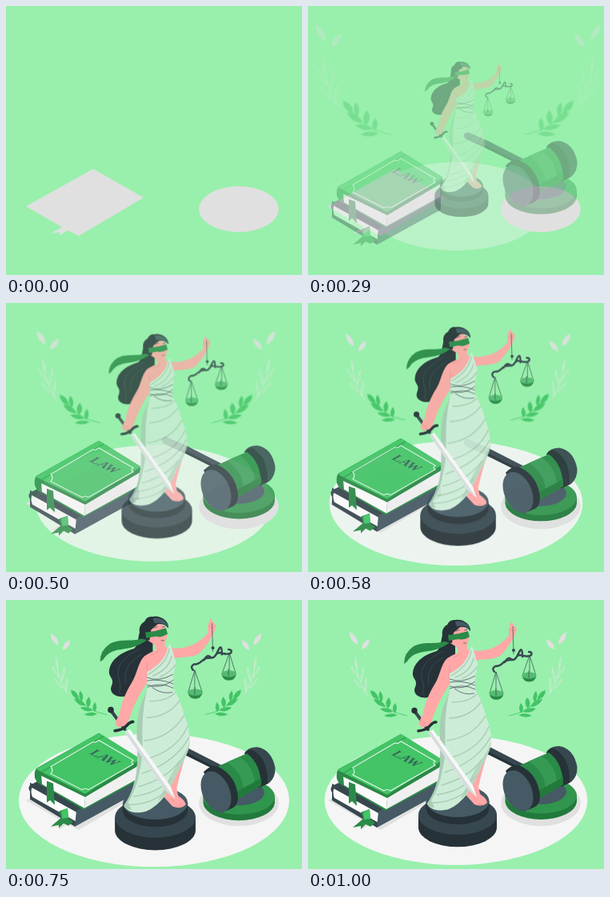
Write an HTML page that moves like this. It is 370x337 px and loops after 1040 ms.

```html
<!DOCTYPE html>
<html lang="en">
<head>
<meta charset="utf-8">
<title>Law</title>
<style>
html, body { margin: 0; height: 100%; overflow: hidden; background: #98f0ac }
svg { display: block; width: 370px; height: 337px }
.fold { fill: none; stroke: #a9ccb5; stroke-width: 1.4; stroke-linecap: round }
.thin { fill: none; stroke: #37474f; stroke-width: .7 }
.crease { fill: none; stroke: #e98b8c; stroke-width: .7 }
.skin { fill: #ffa8a7 }
.ink { fill: #263238 }
.slate { fill: #37474f }
.steel { fill: #455a64 }
.leaf { fill: #43c466 }
.deep { fill: #2a8a47 }
.dark { fill: #217a3b }
.page { fill: #fafafa }
.gown { fill: #cdecd7 }
</style>
</head>
<body>
<svg viewBox="0 0 370 337">
  <ellipse id="floor" cx="185" cy="251" rx="164.3" ry="81" fill="#f5f5f5"/>

  <g fill="#e0e0e0">
    <path d="M25 251 109 204 172 240 91 288 77 281 66 288 68 283 56 285 70 277Z"/>
    <ellipse cx="291" cy="254.5" rx="49.8" ry="28.7"/>
  </g>

  <g id="plants">
    <g id="sprig"></g>
    <use href="#sprig" transform="matrix(-1 0 0 1 375 0)"/>
  </g>

  <g id="books">
    <!-- lower book -->
    <path class="slate" d="M30 233 Q27 237 30 241 L30 251 86 285 166 241 166 222 108 196Z"/>
    <path class="page" d="M33 235 88 266 88 279 33 248 Q30 241 33 235Z"/>
    <path class="steel" d="M88 265 166 221 166 241 86 285Z"/>
    <path class="slate" d="M30 230 88 262 88 267 30 235Z"/>
    <path class="deep" d="M66 266 77 262 78 275 84 279 78 284 72 281 66 287 66 283 56 285 69 274Z"/>
    <path class="leaf" d="M69 266 77 262 78 274 70 275Z"/>
    <!-- upper book -->
    <path class="deep" d="M38 212 Q35 216 36 224 L39 230 97 264 166 227 168 201 116 168Z"/>
    <path class="page" d="M44 220 99 248 98 262 45 232Z"/>
    <path fill="#f0f0f0" d="M99 248 167 208 165 225 98 262Z"/>
    <path class="leaf" d="M37 213 114 169 Q117 168 120 170 L168 200 168 204 99 245 38 215Z"/>
    <path class="deep" d="M37 213 99 244 168 201 168 205 99 248 37 218Z"/>
    <path fill="none" stroke="#2f9f50" stroke-width="1.2" d="M44 217 122 172"/>
    <path fill="none" stroke="#e3f7e8" stroke-width="1.1" d="M56 210 109 179 Q111 181 116 177 L159 202 Q155 205 159 207 L103 239 Q99 236 95 239 L56 219 Q60 215 56 210Z"/>
    <text transform="matrix(.83 .43 -.87 .5 103.5 193.5)" font-family="'Liberation Serif','Noto Serif',serif" font-weight="bold" font-size="16.5" fill="#37655a">LAW</text>
    <path class="deep" d="M51 228 59 231 61 258 55 252 51 255Z"/>
  </g>

  <g id="gavel">
    <path class="dark" d="M246.5 245V253A44.8 23 0 0 0 336 253V245Z"/>
    <ellipse cx="291.2" cy="245" rx="44.8" ry="22.5" fill="#30954d"/>
    <ellipse cx="291" cy="240" rx="32" ry="16" class="steel"/>
    <path class="slate" d="M196 180 Q193 173 200 172 L225 183 270 206 267 213 222 190Z"/>
    <path class="ink" d="M198 181 224 189 267 211 266 214 222 192Z"/>
    <path class="slate" d="M298 191 Q302 183 314 183 Q332 186 336.500 209 Q337 221 329 228 L316 234 Q318 213 298 191Z"/>
    <path class="ink" d="M298 191 Q304 184 309 187 Q328 198 327 229 L316 234 Q316 210 298 191Z"/>
    <path class="deep" d="M263 208 301 191 Q318 203 319 231 L287 250 Q287 225 263 208Z"/>
    <path fill="#369a54" d="M276 202 292 195 Q310 208 311 229 L297 237 Q296 215 276 202Z"/>
    <path class="dark" d="M288 239 319 222 319 231 287 250Z"/>
    <path class="ink" d="M247 214 Q256 205 264 207 Q288 218 290 246 Q290 257 282 260 L270 265Z"/>
    <ellipse cx="262.5" cy="239" rx="17" ry="27" transform="rotate(-24 262.5 239)" class="steel"/>
  </g>

  <g id="statue">
    <path class="ink" d="M138 270V285A49 24.3 0 0 0 236 285V270Z"/>
    <ellipse cx="187" cy="269.5" rx="49" ry="24.5" class="slate"/>
    <path class="ink" d="M147.5 252V261A39.5 20 0 0 0 226.5 261V252Z"/>
    <ellipse cx="187" cy="252" rx="39.5" ry="20" class="steel"/>

    <!-- hair and ribbon -->
    <path class="ink" d="M172 36C164 47 169 57 161 64C147 68 133 76 131 91C130 99 138 100 134 109C130 118 140 124 150 122C160 120 160 111 167 104L184 72 184 48Z"/>
    <path fill="none" stroke="#455a64" stroke-width=".6" d="M169 64C149 74 138 85 143 101S139 116 146 119M170 71C152 82 149 92 151 106"/>
    <path class="deep" d="M176 49C163 58 147 50 132 58Q120 66 120 80L124 77C133 63 147 66 160 62Q172 58 177 53Z"/>

    <!-- arms, neck, leg -->
    <path class="skin" d="M186 57 198 55 199 62C211 65 224 64 235 58Q245 52 251 45L251 36 254 27 257 31 261 36 259 43Q252 58 240 70C229 76 218 73 211 76L208 88 178 104C170 116 163 128 158 142L152 158 142 158 143 146C145 133 150 119 158 106C165 96 166 80 174 73Q182 68 188 66Z"/>
    <path class="crease" d="M251 36 256 39 260 36M177 82 177 99M192 66Q187 71 181 72"/>
    <path class="skin" d="M204 205 225 190Q217 216 213 234L215 243Q224 249 224 254 218 260 208 256L197 244Z"/>
    <path class="crease" d="M206 246 210 251M212 255 218 256"/>

    <!-- gown -->
    <path class="gown" d="M205 57 212 80 209 97 209 112C216 124 220 136 223 147C227 158 230 170 229 181C226 194 215 211 209 226L199 243Q188 257 176 262C165 265 153 264 149 255C158 243 164 224 165 205C167 184 162 158 168 136L177 114 177 92C187 88 200 76 202 63Z"/>
    <path fill="#a9ccb5" d="M177 114Q173 130 172 146C170 170 174 190 168 213Q164 236 154 251L158 260Q150 260 149 255C160 239 165 220 165 203 166 181 162 159 168 136Z"/>
    <path fill="#b4d6bf" d="M229 176C226 191 212 204 203 224L190 250 199 243 209 226C216 208 228 194 229 176Z"/>
    <path class="fold" d="M204 64Q201 82 179 95M207 73Q203 90 184 97M211 84Q204 94 193 98M211 118Q201 128 180 128M216 128Q202 147 177 148M222 145Q206 172 174 176M226 159Q212 190 173 199M228 172Q212 202 171 216M217 200Q202 222 167 232M207 222Q190 240 161 244M201 237Q182 254 155 254"/>
    <path class="thin" d="M177 99Q192 105 209 95M177 103Q193 100 209 107M177 108Q194 114 209 102M177 111Q194 104 209 112M183 111Q195 120 208 117"/>

    <!-- head -->
    <path class="skin" d="M176 37Q187 29 199 37L202 47 199 57Q193 63 186 59L178 54Z"/>
    <path class="ink" d="M171 52C165 42 168 34 174 31Q177 24 184 25C193 23 204 30 203 39Q198 33 190 34L182 41 180 54Z"/>
    <path class="steel" d="M184 27C194 25 202 31 203 38Q196 31 186 33Z"/>
    <path class="deep" d="M175 44Q188 43 200 39L202 46Q194 51 188 49L176 51Z"/>
    <path class="thin" stroke="#ad4f57" d="M194 54 198 54"/>
    <path class="thin" d="M185 39 190 37M195 38 199 37"/>

    <!-- sword -->
    <path fill="#f7f7f7" d="M150 166 156 162 206 232 211 247 199 236Z"/>
    <path fill="#d5dcdc" d="M150 166 153 164 211 247 199 236Z"/>
    <path fill="none" stroke="#37474f" stroke-width="4" stroke-linecap="round" d="M133 139 150 162"/>
    <circle cx="133" cy="138.5" r="3.7" class="ink"/>
    <path fill="none" stroke="#263238" stroke-width="3.5" stroke-linecap="round" d="M138 164Q148 163 152 158T160 153"/>
    <path class="skin" d="M142 146 151 147 153 153 149 158 142 160 138 155Z"/>
    <path class="crease" d="M141 152 148 155M142 156 147 158"/>

    <!-- scales -->
    <path class="thin" d="M256 33 257 68M235 90 227 117M235 90 235 121M235 90 244 117M277 69 268 95M277 69 277 99M277 69 285 95"/>
    <path fill="none" stroke="#37474f" stroke-width="2.4" stroke-linecap="round" d="M233 90Q229 86 234 83C243 83 242 78 248 76S258 77 261 71 272 74 279 69Q281 65 276 65M246 78Q250 70 254 74T263 67 268 71"/>
    <circle cx="257" cy="63" r="2" class="slate"/>
    <g id="pan">
      <path class="deep" d="M226.500 117Q228 125 235.500 125T244.500 117Z"/>
      <ellipse cx="235.5" cy="117" rx="9" ry="4" fill="#54bb71"/>
      <path class="thin" d="M235 111 235 120"/>
    </g>
    <use href="#pan" x="41" y="-22.5"/>
  </g>
</svg>
<script>
const $ = id => document.getElementById(id);

// A leaf between two points, bulging by w on either side
function leaf(x, y, u, v, w) {
  const mx = (x + u) / 2, my = (y + v) / 2, n = Math.hypot(u - x, v - y);
  const dx = (y - v) / n * w, dy = (u - x) / n * w;
  return `M${x} ${y}Q${mx + dx} ${my + dy} ${u} ${v}Q${mx - dx} ${my - dy} ${x} ${y}Z`;
}
const leaves = list => list.map(a => leaf(...a)).join('');

const pale = leaves([[52, 40, 62, 56, 6], [77, 49, 67, 62, 6]]);
const outline = leaves([
  [59, 72, 61, 86, 2.5], [54, 83, 63, 98, 2.5], [70, 84, 66, 102, 2.5],
  [57, 99, 67, 111, 2.5], [73, 98, 71, 116, 2.5]
]);
const green = leaves([
  [78, 113, 88, 125, 6], [90, 114, 92, 128, 5], [82, 124, 97, 134, 6],
  [101, 122, 100, 136, 6], [90, 136, 106, 140, 5], [109, 129, 108, 142, 5],
  [95, 145, 112, 144, 4.5]
]);
$('sprig').innerHTML = `
  <path fill="#e0e0e0" d="${pale}"/>
  <path fill="none" stroke="#d5e8da" stroke-width=".8" d="${outline}M60 78Q62 102 75 120"/>
  <path class="leaf" d="${green}"/>
  <path fill="none" stroke="#43c466" stroke-width=".8" d="M84 119Q97 140 124 145"/>`;

// cubic-bezier(.36, -.01, .5, 1.38)
function ease(x) {
  if (x >= 1) return 1;
  const curve = (a, b, u) => 3 * a * u * (1 - u) ** 2 + 3 * b * u * u * (1 - u) + u ** 3;
  let lo = 0, hi = 1;
  for (let i = 0; i < 24; i++) {
    const mid = (lo + hi) / 2;
    if (curve(.36, .5, mid) < x) lo = mid; else hi = mid;
  }
  return curve(-.01, 1.38, lo);
}

const zoom = (x, y, s) => `translate(${x} ${y}) scale(${s}) translate(${-x} ${-y})`;
const slide = y => `translate(0 ${y})`;
const poses = {
  floor: p => zoom(185, 251, .5 + p / 2),
  plants: p => zoom(187.5, 94.5, 1.5 - p / 2),
  books: p => slide(22.2 * (1 - p)),
  gavel: p => slide(-22.2 * (1 - p)),
  statue: p => zoom(202.5, 167, .5 + p / 2)
};

const start = performance.now();
function draw() {
  const ms = (performance.now() - start) % 1040;
  const step = Math.floor(ms * .024 + .1); // 24 steps a second
  const p = step < 3 ? 0 : ease(step / 24 + .03);
  for (const id in poses) {
    $(id).setAttribute('transform', poses[id](p));
    $(id).setAttribute('opacity', Math.min(p, 1));
  }
  requestAnimationFrame(draw);
}
draw();
</script>
</body>
</html>
```
